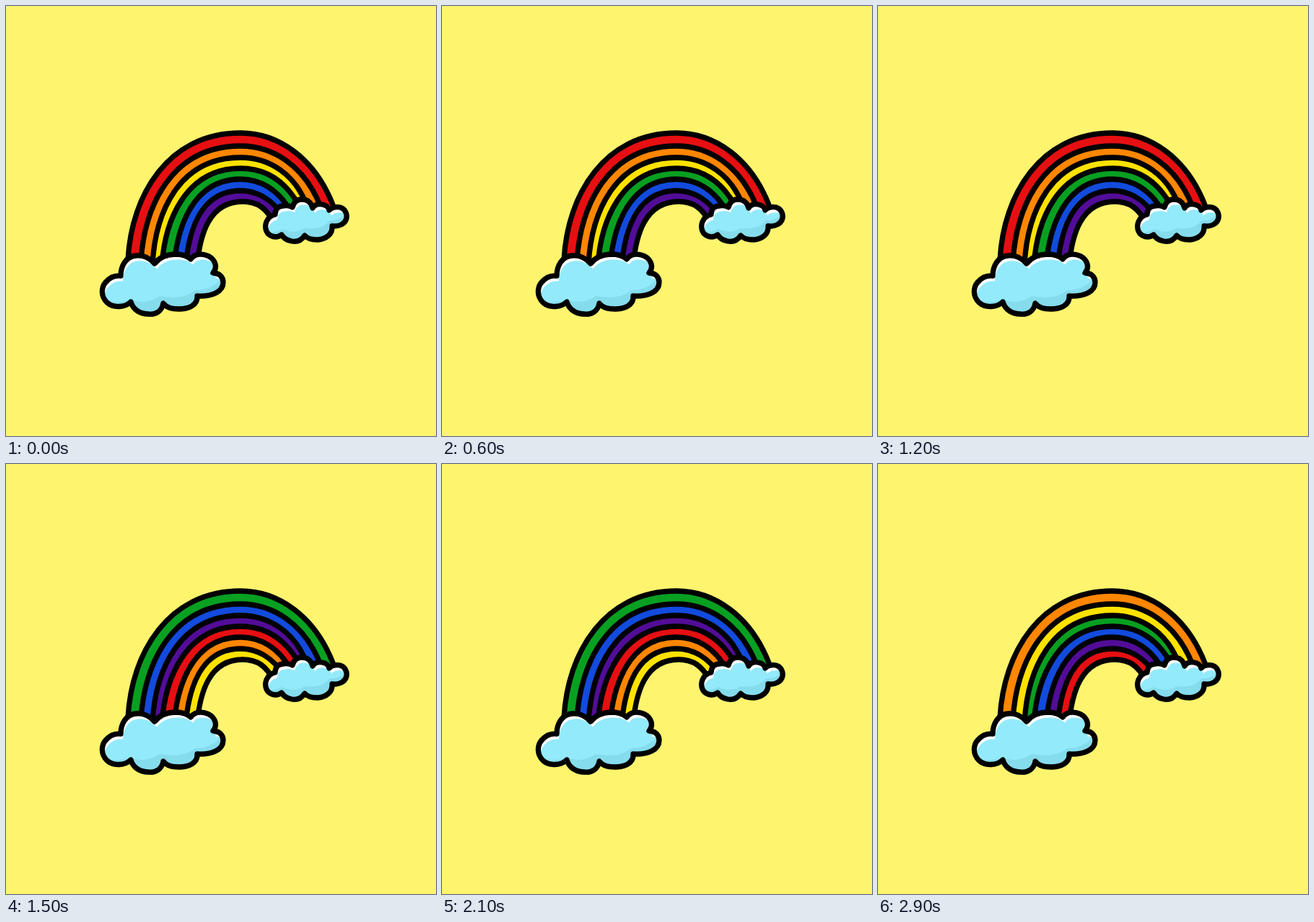
Recreate the animation shown at these times as an HTML page. Size 596x596 px, loop 3 s.

```html
<!DOCTYPE html>
<html lang="en">
<head>
<meta charset="utf-8">
<title>Rainbow</title>
<style>
  html, body { margin: 0; height: 100%; overflow: hidden; background: #fff46e; }
  svg { display: block; width: 100%; height: 100%; }
  .line { stroke: #000; stroke-width: 7.3; stroke-linecap: round; stroke-linejoin: round; }
</style>
</head>
<body>
<svg id="stage" viewBox="0 0 596 596"></svg>
<script>
const COLORS = ['#e60f12', '#ff8600', '#ffe200', '#08a021', '#124bdd', '#520d98'];
const STEP = 100;

// Arch outlines from the outside in; the last one bounds the opening.
const ARCHES = [
  'M169 352C174 260 226 176 325 176C377 176 428 210 454 278',
  'M187 355C191 276 231 194 325 194C369 194 413 220 436 278',
  'M203 358C207 287 239 210 325 210C366 210 400 234 416 274',
  'M216 360C220 299 248 225 325 225C362 225 389 245 407 278',
  'M233 360C237 309 258 240 325 240C353 240 378 255 394 284',
  'M249 360C253 315 268 256 325 256C350 256 370 270 383 290',
  'M265 358C269 318 281 271 328 271C348 271 362 280 370 300L378 310'
];

const CLOUDS = [
  {
    outline: `M159 374C159 361 166 347 180 346C190 345 199 349 206 357
      C212 349 221 344.5 234 344C244 344 251 346 256 351C261 344 268 343 276 345
      C288 348 295 360 287 370C296 370 301 376 301 383C301 396 286 403 265 402
      C266 414 254 420 240 420C231 420 223 419 218 412C216 424 206 428 198 427
      C186 427 176 421 173 410C165 418 149 419 140 411C131 402 132 390 138 383
      C143 377 150 373 159 374Z`,
    shade: 'M140 409Q158 413 172 407Q194 415 213 402Q246 408 262 394Q285 394 299 377V435H140Z'
  },
  {
    outline: `M373 289C373 281 378 277 385 277C390 276 394 277 397 279
      C399 271 404 268 410 268C417 268 423 272 425 280C428 275 433 274 438 275
      C444 276 447 279 448 283C452 279 457 278 463 279C470 281 473 288 472 294
      C470 302 462 306 452 305C453 316 444 323 432 324C425 324 418 323 414 318
      C409 326 402 327 396 326C390 325 385 322 382 317C374 323 364 319 361 312
      C358 305 360 292 373 289Z`,
    shade: 'M362 312Q374 315 383 309Q400 317 414 308Q438 311 449 297Q463 298 472 288V330H362Z'
  }
];

const cloud = ({ outline, shade }, i) => `
  <clipPath id="cloud${i}"><path d="${outline}"/></clipPath>
  <g clip-path="url(#cloud${i})">
    <path d="${outline}" fill="#fff"/>
    <path d="${outline}" fill="#93eafb" transform="translate(3 7.5)"/>
    <path d="${shade}" fill="#85dcec"/>
  </g>
  <path class="line" d="${outline}" fill="none"/>`;

const stage = document.getElementById('stage');
stage.innerHTML =
  ARCHES.map(d => `<path class="line arch" d="${d}" fill="#fff46e"/>`).join('') +
  CLOUDS.map(cloud).join('');
const bands = [...stage.querySelectorAll('.arch')].slice(0, COLORS.length);

// Each step moves every colour one band inwards.
function draw() {
  const shift = Math.floor(performance.now() / STEP) % COLORS.length;
  bands.forEach((band, i) =>
    band.setAttribute('fill', COLORS[(i - shift + COLORS.length) % COLORS.length]));
  requestAnimationFrame(draw);
}
draw();
</script>
</body>
</html>
```
